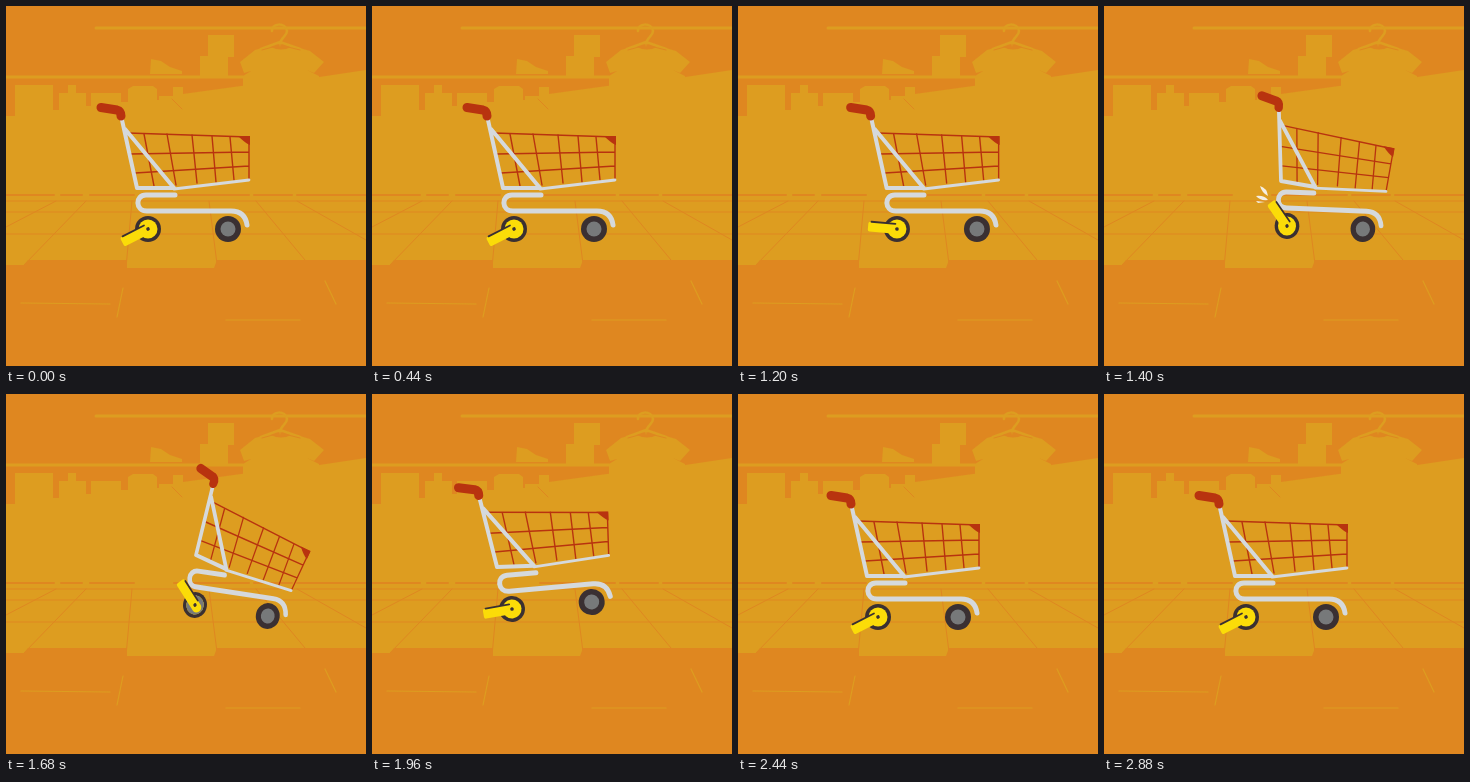
These frames come from a looping animation (360 by 360 pixels, 2.92 s). An HTML page with a canvas:

```html
<!DOCTYPE html>
<html lang="en">
<head>
<meta charset="utf-8">
<title>Locked shopping cart</title>
<style>
html, body { margin: 0; height: 100%; overflow: hidden; background: #df8720; }
canvas { display: block; width: 360px; height: 360px; }
</style>
</head>
<body>
<canvas id="stage" width="360" height="360"></canvas>
<script>
const ctx = document.getElementById('stage').getContext('2d');
const LOOP = 2920, STEP = 40;
const ORANGE = '#df8720', GOLD = '#dd9d20', RED = '#b8330f', STEEL = '#d5d9dc',
  DARK = '#3a3032', GREY = '#77797a', YELLOW = '#fbdc08';

function fill(d, color) {
  ctx.fillStyle = color;
  ctx.fill(new Path2D(d));
}
function line(d, color, width) {
  ctx.strokeStyle = color;
  ctx.lineWidth = width;
  ctx.stroke(new Path2D(d));
}
function disc(x, y, r, color) {
  ctx.fillStyle = color;
  ctx.beginPath();
  ctx.arc(x, y, r, 0, 7);
  ctx.fill();
}
function place(x, y, deg, sx, draw) {
  ctx.save();
  ctx.translate(x, y);
  ctx.rotate(deg * Math.PI / 180);
  ctx.scale(sx, 1);
  draw();
  ctx.restore();
}

// time, basket x y turn, base x y turn, clamp angle
const rest = [131, 182, 0, 142, 223, 0, 153];
const poses = [
  [960, ...rest],
  [1240, 153, 182, 0, 163, 223, 0, 193],
  [1360, 173, 179, 5, 180, 222, 1, 230],
  [1400, 177, 175, 10, 183, 220, 2.3, 234],
  [1520, 185, 166, 19, 187, 214, 6, 235],
  [1680, 190, 161, 25, 189, 211, 8.6, 235],
  [1740, 190.5, 161, 25.5, 189.5, 211, 8.6, 234],
  [1860, 155, 166, 10, 163, 211, 0, 198],
  [1960, 125, 173, -1.8, 140, 215, -5, 170],
  [2060, 124, 182, -1, 137, 223, 0, 153],
  [2440, 129, 182, 0, 140, 223, 0, 153],
  [2640, ...rest]
];

// Slope of one value at a pose; flat at turning points
function slope(i, k) {
  const a = poses[i - 1], b = poses[i], c = poses[i + 1];
  if (!a || !c) return 0;
  const s = (b[k] - a[k]) / (b[0] - a[0]), e = (c[k] - b[k]) / (c[0] - b[0]);
  return s * e > 0 ? 2 * s * e / (s + e) : 0;
}
function poseAt(t) {
  const i = poses.findIndex(p => t < p[0]);
  if (i < 1) return rest;
  const a = poses[i - 1], b = poses[i], h = b[0] - a[0], u = (t - a[0]) / h;
  return rest.map((_, n) => {
    const k = n + 1;
    return a[k] + (b[k] - a[k]) * u * u * (3 - 2 * u)
      + h * u * (1 - u) * ((1 - u) * slope(i - 1, k) - u * slope(i, k));
  });
}

function drawShop() {
  ctx.fillStyle = ORANGE;
  ctx.fillRect(0, 0, 360, 360);
  // back wall goods and floor
  fill(`M0 110H9V79H47V104H53V87H62V79H70V87H80V100H85V87H115V96H122V83L127 80H147L151 83V94H153V90H167V81H177V88
    L235 80L300 73L360 64V254H211L208 262H121V254H22L18 259H0Z`, GOLD);
  line('M90 22H360', GOLD, 3);
  line('M0 71H237', GOLD, 3);
  fill('M202 29H228V51H222V70H194V50H202Z', GOLD);
  fill('M145 53L155 55L164 61L176 65V68H144Z', GOLD);
  fill('M234 56L249 44L263 40Q275 47 287 40L304 45L318 56L308 67L301 64L313 70V80H237V70L245 65L238 67Z', GOLD);
  line('M266 25C265 17 280 16 281 25C281 31 274 31 274 39M255 43L274 36L294 43', GOLD, 2.5);
  line('M256 44L274 39L294 44M166 93L176 103', ORANGE, 1);
  // tile joints
  line('M0 189H48M55 189H76M84 189H128M168 189H243M248 189H286M291 189H360', ORANGE, 2);
  for (const y of [195, 206, 228]) line(`M0 ${y}H360`, ORANGE, 1);
  line('M50 195L0 221M80 195L18 259M126 195L120 262M203 195L211 258M250 195L299 254M291 195L360 234', ORANGE, 1);
  line('M15 297L104 298M117 282L111 311M319 275L330 298M220 314H294', GOLD, 1.2);
}

function drawBase(clamp, grey) {
  line('M27 -34H-2C-13 -34 -13 -18 -1 -18H83Q97 -18 99 -4', STEEL, 5);
  disc(80, 0, 13, DARK);
  disc(80, 0, 7.5, GREY);
  disc(0, 0, 13, DARK);
  disc(0, 0, 9.5, YELLOW);
  ctx.globalAlpha = grey;
  disc(0, 0, 9.5, GREY);
  ctx.globalAlpha = 1;
  place(0, 0, clamp, 1, () => {
    fill('M-4 -5H27Q29 -5 29 -3V3Q29 5 27 5H-4Q-8 4 -8 0Q-8 -4 -4 -5Z', YELLOW);
    line('M2 5H26', DARK, 1.8);
    disc(0, 0, 1.8, DARK);
  });
}

function drawBasket() {
  line('M-9 -55L112 -51V-9M-7 -34L112 -36M-2 -15L112 -22', RED, 1.4);
  line('M7 -54L17 -2M30 -54L39 -3M55 -53L60 -5M75 -52L79 -6M93 -51L97 -8', RED, 1.4);
  fill('M101 -52H113V-43Q108 -45 101 -52Z', RED);
  line('M37 1L112 -8', STEEL, 2.8);
  line('M-15 -68L0 0H37L-12 -59', STEEL, 4);
  line('M-36 -80.5L-20 -78Q-16 -77 -16 -72', RED, 9);
}

function drawSparks(t) {
  if (t < 1360 || t > 1480) return;
  const k = (t - 1400) / 80;
  place(-5 * k, -4 * k, 0, 1, () =>
    fill('M156 180Q163 182 164 190Q158 187 156 180M152 190Q160 189 164 194Q156 195 152 190M152 195L161 196L154 197Z', '#f4eee2'));
}

function draw(t) {
  const [ux, uy, ur, bx, by, br, clamp] = poseAt(t);
  // the cart foreshortens and the hub darkens as it tips
  const tip = Math.sqrt(Math.max(0, ur));
  const grey = Math.min(1, Math.max(0, (ur - 10) / 15));
  ctx.lineCap = ctx.lineJoin = 'round';
  drawShop();
  place(bx, by, br, 1 - .016 * tip, () => drawBase(clamp - br, grey));
  place(ux, uy, ur, 1 - .019 * tip, drawBasket);
  drawSparks(t);
}

const start = performance.now();
function tick() {
  draw(Math.floor((performance.now() - start) % LOOP / STEP) * STEP);
  requestAnimationFrame(tick);
}
tick();
</script>
</body>
</html>
```
